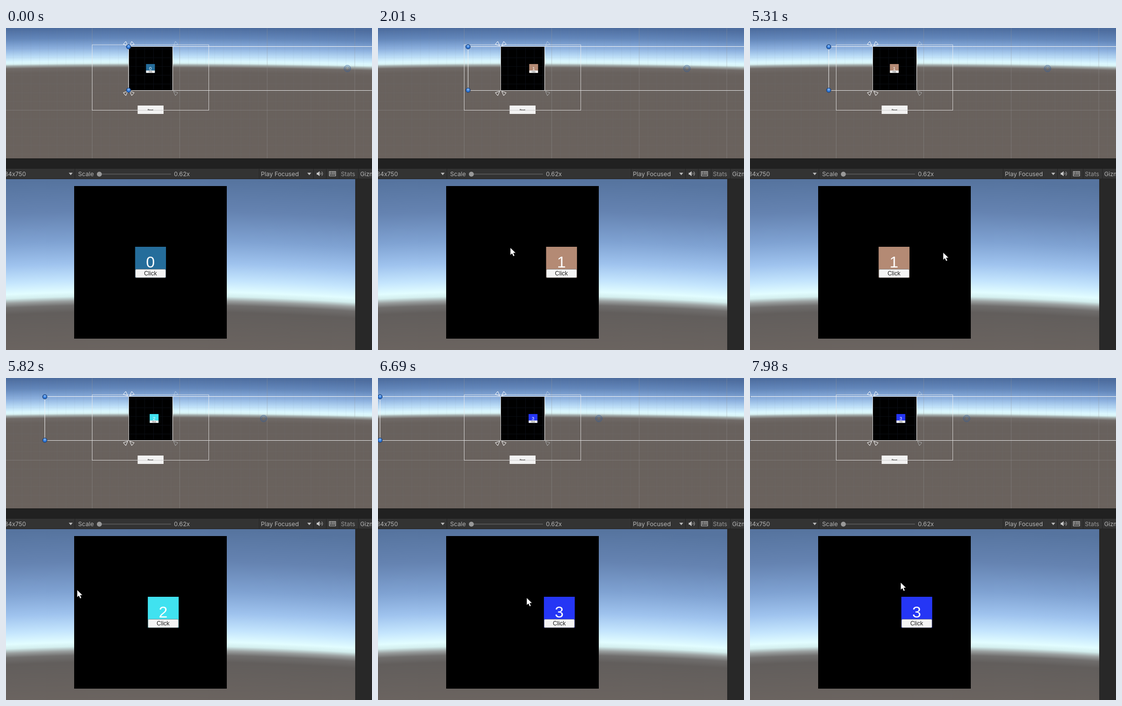
Recreate the animation shown at these times as an HTML page with a canvas. Size 741x652 px, loop 8 s.

```html
<!DOCTYPE html>
<html lang="en">
<head>
<meta charset="utf-8">
<title>Paged scroll view</title>
<style>
  html, body { margin: 0; width: 100%; height: 100%; overflow: hidden; background: #282828; }
  canvas { display: block; width: 741px; height: 652px; }
</style>
</head>
<body>
<canvas id="stage" width="741" height="652"></canvas>
<script>
const W = 741, H = 652, LOOP = 8000, STEP = 30;
const PAGE = 308, SCALE = 88.5 / PAGE;
const COLORS = ['#256d9b', '#b48a74', '#40e2f0', '#2536f5'];
const UI = 'Inter, sans-serif', LABEL = '"Liberation Sans", Arial, sans-serif';

const linear = p => p;
const out = p => 1 - (1 - p) ** 2;
const smooth = p => p * p * (3 - 2 * p);
const glide = p => (1 - Math.exp(-2.6 * p)) / (1 - Math.exp(-2.6));

// [time, values, easing towards this key]
const SCROLL = [
  [0, [0]], [1380, [0]], [1500, [20]], [1770, [102]], [2400, [308], out],
  [5280, [308]], [5310, [309]], [5450, [340]], [5700, [505]],
  [7000, [875], glide], [7500, [924], smooth], [7740, [924]], [7980, [879]]
];
const POINTER = [
  [990, [735, 425]], [1350, [387, 440], out], [1500, [367, 441]], [1770, [285, 442]],
  [1860, [245, 443]], [2460, [391.5, 454.5], smooth], [2760, [391.5, 454.5]],
  [2790, [391.5, 455.5]], [4320, [391.5, 455.5]], [4350, [391, 454.5]],
  [5310, [391, 454.5]], [5450, [357, 450]], [5700, [192, 434]], [5820, [144, 429]],
  [5910, [130, 428], out], [6690, [301, 445], smooth], [7600, [247, 428], smooth],
  [7710, [247, 425]], [7980, [305, 414], out]
];

function sample(keys, t) {
  const i = keys.findIndex(k => k[0] > t);
  if (i < 0) return keys[keys.length - 1][1];
  if (i === 0) return keys[0][1];
  const [t0, a] = keys[i - 1], [t1, b, ease = linear] = keys[i];
  const p = ease((t - t0) / (t1 - t0));
  return a.map((v, n) => v + (b[n] - v) * p);
}

const stage = document.getElementById('stage').getContext('2d');
const backdrop = document.createElement('canvas');
backdrop.width = W;
backdrop.height = H;
let c = backdrop.getContext('2d');

function rect(x, y, w, h, fill) {
  c.fillStyle = fill;
  c.fillRect(x, y, w, h);
}
function line(x1, y1, x2, y2, color, width = 1) {
  c.strokeStyle = color;
  c.lineWidth = width;
  c.beginPath();
  c.moveTo(x1, y1);
  c.lineTo(x2, y2);
  c.stroke();
}
function poly(points, fill, stroke) {
  c.beginPath();
  points.forEach(([x, y]) => c.lineTo(x, y));
  c.closePath();
  if (fill) { c.fillStyle = fill; c.fill(); }
  if (stroke) { c.strokeStyle = stroke; c.lineWidth = 1; c.stroke(); }
}
function disc(x, y, r, fill, stroke) {
  c.beginPath();
  c.arc(x, y, r, 0, 7);
  if (fill) { c.fillStyle = fill; c.fill(); }
  if (stroke) { c.strokeStyle = stroke; c.lineWidth = 1; c.stroke(); }
}
function text(str, x, y, font, fill, align = 'left') {
  c.font = font;
  c.fillStyle = fill;
  c.textAlign = align;
  c.fillText(str, x, y);
}
function clipped(x, y, w, h, draw) {
  c.save();
  c.beginPath();
  c.rect(x, y, w, h);
  c.clip();
  draw();
  c.restore();
}

// Sky and ground with a slightly bent horizon
function sky(top, width, height, bend, stops) {
  clipped(0, top, width, height, () => {
    const g = c.createLinearGradient(0, top, 0, top + height);
    stops.forEach(([y, color]) => g.addColorStop((y - top) / height, color));
    c.fillStyle = g;
    for (let x = 0; x < width; x++) {
      const dy = bend * (x - 290) ** 2;
      c.setTransform(1, 0, 0, 1, 0, dy);
      c.fillRect(x, top - dy, 1, height + dy);
    }
    c.setTransform(1, 0, 0, 1, 0, 0);
  });
}

function grid() {
  const faint = 'rgba(135,145,155,.09)', strong = 'rgba(150,150,150,.42)';
  for (let i = -9; i < 33; i++) {
    const x = 174.5 + i * 17.72;
    line(x, 0, x, 264, i % 10 ? faint : strong);
  }
  for (let i = -5; i < 10; i++) {
    const y = 166.5 - i * 17.72;
    line(0, y, W, y, i ? faint : strong);
  }
}

function toolbar() {
  rect(0, 264, W, 21, '#212121');
  rect(0, 264, W, 1, '#191919');
  rect(0, 285, W, 21, '#333333');
  rect(0, 305, W, 1, '#232323');
  for (const x of [139, 512, 622, 648, 674, 713]) rect(x, 285, 1, 20, '#232323');
  const font = '12.2px ' + UI, gray = '#b4b4b4';
  text('1334x750', 40.5, 300, font, gray, 'right');
  text('Scale', 146, 300, font, gray);
  text('0.62x', 340, 300, font, gray);
  text('Play Focused', 516, 300, font, gray);
  text('Stats', 678, 300, font, '#999');
  text('Gizmos', 717, 300, font, gray);
  for (const x of [131, 614]) poly([[x - 4, 293], [x + 4, 293], [x, 298]], '#b8b8b8');
  rect(184, 295, 150, 1.5, '#5e5e5e');
  disc(189, 296, 5, '#999');
  poly([[629, 293], [631, 293], [635, 290], [635, 300], [631, 297], [629, 297]], '#c4c4c4');
  c.strokeStyle = '#c4c4c4';
  for (const r of [3, 6]) {
    c.beginPath();
    c.arc(635, 295, r, -.8, .8);
    c.stroke();
  }
  c.strokeRect(654.5, 290.5, 13, 9);
  for (const y of [293.5, 296.5]) line(655, y, 668, y, '#aaa');
  for (const x of [657.5, 661.5, 664.5]) line(x, 291, x, 297, '#aaa');
}

function drawBackdrop() {
  sky(0, W, 264, 3e-5, [
    [0, '#4d6d9f'], [20, '#6286ba'], [40, '#8cb0de'], [56, '#b9dbf6'], [67, '#dcf8ff'],
    [71, '#d9f3f5'], [75, '#a1aaa9'], [80, '#706a67'], [90, '#68615d'], [264, '#6a625d']
  ]);
  grid();
  c.strokeStyle = 'rgba(240,240,240,.75)';
  c.lineWidth = 1;
  c.strokeRect(174.5, 34, 236, 132.5);
  sky(306, 707, 346, 8e-5, [
    [306, '#56749f'], [370, '#6583b1'], [430, '#7fa2d2'], [475, '#9fc3ee'], [510, '#c4e5fd'],
    [533, '#e2fdff'], [542, '#d3eeee'], [551, '#9a9f9f'], [560, '#706e6d'],
    [574, '#625e5c'], [652, '#6b6460']
  ]);
  rect(707, 306, 34, 346, '#282828');
  toolbar();
  rect(138, 320, 309, 309, '#000');
  rect(248, 38, 89, 88.5, '#000');
  rect(266.5, 157, 52.5, 17, '#f2f2f2');
  line(266, 166.5, 319, 166.5, '#cfcfcf');
  text('Reset', 292.5, 166.5, 'bold 4px ' + LABEL, '#222', 'center');
}

// One page card, centred on the origin
function card(page) {
  rect(-31, -31.5, 62.5, 62.5, COLORS[page]);
  text(page, 0, 10.5, '32px ' + LABEL, '#fff', 'center');
  c.beginPath();
  c.roundRect(-30.5, 14, 61.5, 17, 2);
  c.fillStyle = '#f4f4f4';
  c.fill();
  c.strokeStyle = 'rgba(90,90,90,.6)';
  c.lineWidth = 1;
  c.stroke();
  text('Click', 0, 26.5, '12px ' + LABEL, '#222', 'center');
}

function cards(cx, cy, scale, scroll) {
  COLORS.forEach((_, page) => {
    c.save();
    c.translate(cx + (page * PAGE - scroll) * scale, cy);
    c.scale(scale, scale);
    card(page);
    c.restore();
  });
}

function anchor(x, y, side, up, color) {
  const points = [[2, 2], [11, 5], [6, 11]];
  poly(points.map(([dx, dy]) => [x + dx * side, y - dy * up]), null, color);
}

function handle(x, y) {
  disc(x, y, 4.5, '#2c74d4', '#17335f');
  disc(x, y - 1.3, 2.4, 'rgba(150,200,255,.65)');
}

function selection(left) {
  line(left, 37.5, W, 37.5, '#f4f4f4');
  line(left, 126.5, W, 126.5, '#e0e0e0');
  line(left, 37.5, left, 126.5, '#f0f0f0');
  line(337.5, 37.5, 337.5, 126.5, '#f0f0f0');
  line(248.5, 37.5, 248.5, 126.5, '#cccccc');
  for (const [y, up] of [[38, 1], [126, -1]]) {
    anchor(248.5, y, -1, up, '#fff');
    anchor(248.5, y, 1, up, '#fff');
    anchor(337, y, 1, up, 'rgba(225,235,240,.5)');
    handle(left, y);
  }
  const mid = left + 443;
  disc(mid, 82, 6.5, null, 'rgba(42,92,160,.8)');
  disc(mid, 82, 4, null, 'rgba(42,92,160,.55)');
}

function pointer([x, y]) {
  c.save();
  c.translate(x, y);
  poly([[0, 0], [0, 15], [3.5, 12], [6, 17.5], [8.7, 16.3], [6.3, 11], [11, 10.7]],
    '#fff', 'rgba(0,0,0,.55)');
  c.restore();
}

function render(t) {
  const [scroll] = sample(SCROLL, t);
  c.drawImage(backdrop, 0, 0);
  clipped(248, 38, 89, 88.5, () => {
    for (let i = 0; i < 6; i++) {
      const x = 245.4 + i * 17.72, y = 42.5 + i * 17.72;
      line(x, 38, x, 127, '#0b0e14');
      line(248, y, 337, y, '#0b0e14');
    }
    cards(292.4, 82, SCALE, scroll);
  });
  clipped(138, 320, 309, 309, () => cards(292.4, 474.5, 1, scroll));
  selection(248.2 - scroll * SCALE);
  if (t >= 990) pointer(sample(POINTER, t));
}

drawBackdrop();
c = stage;
const start = performance.now();
function tick() {
  const t = (performance.now() - start) % LOOP;
  render(Math.floor(t / STEP + 1e-6) * STEP);
  requestAnimationFrame(tick);
}
tick();
</script>
</body>
</html>
```
